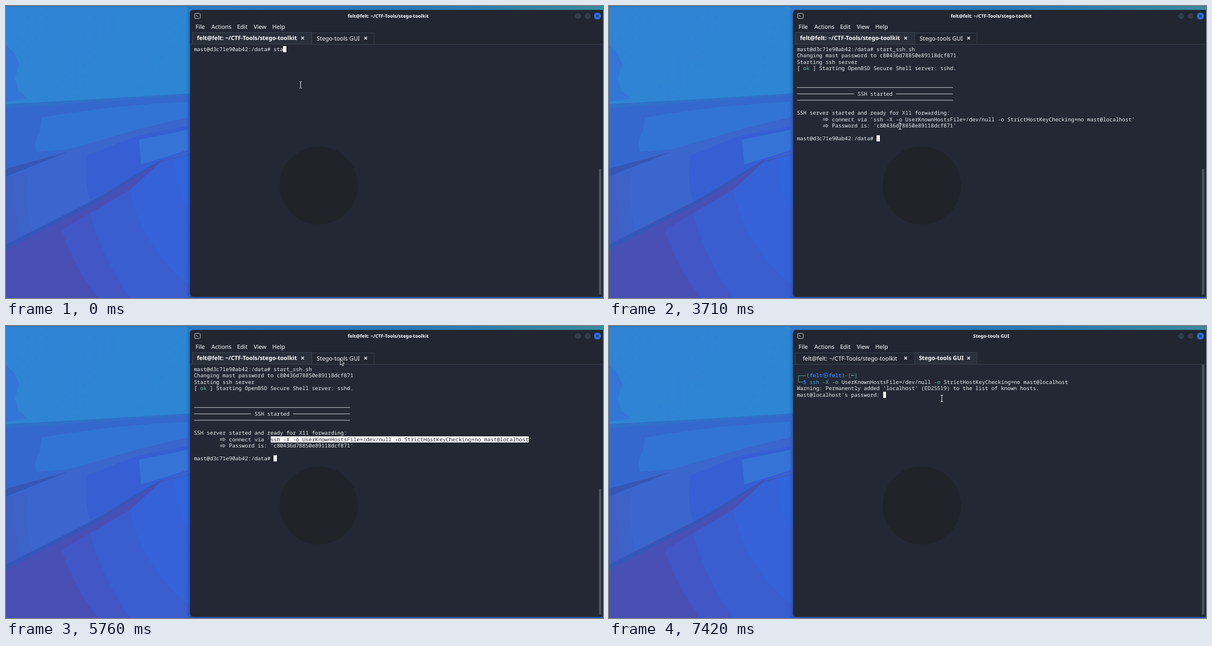
Animation, 1069 px wide and 524 px high, one loop 8 s. Source, as an HTML page:

```html
<!DOCTYPE html>
<html lang="en">
<head>
<meta charset="utf-8">
<title>Terminal session</title>
<style>
  html, body { margin: 0; width: 100%; height: 100%; overflow: hidden; background: #3565cf; }
  svg { display: block; width: 1069px; height: 524px; }
  text { white-space: pre; text-rendering: geometricPrecision; fill: #eef0f2; }
  .ui { font: 10.48px "Noto Sans", "Open Sans", sans-serif; }
  .ui text { fill: #fff; }
  .tab { text-anchor: middle; }
  .tab.on { font-weight: 700; font-size: 10.35px; }
  #title { font-weight: 700; font-size: 8.4px; text-anchor: middle; }
  #term { font: 9.52px "Noto Sans Mono", "DejaVu Sans Mono", monospace; }
  #term rect { shape-rendering: crispEdges; }
  .mark { font: 700 9.6px "Noto Sans CJK KR", "Noto Sans CJK JP", "Noto Sans CJK", sans-serif; text-anchor: middle; }
</style>
</head>
<body>
<svg viewBox="0 0 1069 524" xmlns="http://www.w3.org/2000/svg">
  <defs>
    <linearGradient id="sky" x2="1" y2="0.3">
      <stop offset="0" stop-color="#3183d5"/><stop offset="1" stop-color="#2c86d3"/>
    </linearGradient>
    <linearGradient id="strip">
      <stop offset="0" stop-color="#2b79c4"/><stop offset=".55" stop-color="#2a78b4"/><stop offset="1" stop-color="#3a8a9c"/>
    </linearGradient>
    <linearGradient id="shade">
      <stop offset="0" stop-color="#12306e" stop-opacity="0"/><stop offset="1" stop-color="#12306e" stop-opacity=".3"/>
    </linearGradient>
  </defs>

  <!-- wallpaper -->
  <rect width="340" height="524" fill="#3568cf"/>
  <path d="M0 0H340V158L180 168L0 183Z" fill="url(#sky)"/>
  <path d="M0 70L14 84L24 104L16 130L22 152L40 166L0 172Z" fill="#3377d6"/>
  <path d="M0 176L180 166L340 156V160L180 170L0 184Z" fill="#2f70c8"/>
  <path d="M64 200Q190 178 326 172V238L120 256L54 262Q50 240 60 228Z" fill="#3274d5"/>
  <path d="M0 292L110 258L240 220L340 196V262L277 278L150 355L0 432Z" fill="#3a66cd"/>
  <path d="M0 292L110 262L60 282L0 306Z" fill="#3457b8"/>
  <path d="M146 268L238 232L326 216V262L277 278L150 350Q140 310 146 268Z" fill="#365fd3"/>
  <path d="M238 240L326 222V258L290 270L242 284Z" fill="#3573d6"/>
  <path d="M0 306L12 304Q8 360 28 416L0 432Z" fill="#405fc4"/>
  <path d="M12 304L40 296Q30 350 48 404L28 416Q8 360 12 304Z" fill="#3d62c8"/>
  <path d="M0 432L150 355L277 278L340 262V524H0Z" fill="#4850b6"/>
  <path d="M100 402L150 372Q170 450 222 524H166Q122 470 100 402Z" fill="#4157c6"/>
  <path d="M150 372L222 330Q246 420 318 494V524H222Q170 450 150 372Z" fill="#3a5dcf"/>
  <path d="M222 330L277 280L340 262V506L318 494Q238 420 222 330Z" fill="#3562d6"/>
  <path d="M318 494L340 506V524H318Z" fill="#3a5dcf"/>
  <path d="M302 276L340 262V376Q300 340 302 276Z" fill="#3065dc"/>
  <path d="M0 428L150 352L277 276V280L150 360L0 438Z" fill="#3756ba"/>
  <rect x="322" y="6" width="8" height="518" fill="url(#shade)"/>
  <rect x="325" width="744" height="12" fill="url(#strip)"/>
  <rect width="330" height="2" fill="#2b78bd"/>
  <rect x="329" y="518" width="740" height="6" fill="#2c50a8"/>

  <!-- window -->
  <rect x="329.5" y="7" width="744" height="515" rx="6" fill="#232834"/>
  <path d="M329.5 69V13Q329.5 7 335.5 7H1069V69Z" fill="#212631"/>
  <circle cx="560" cy="322" r="70" fill="#20232a"/>
  <rect x="337.8" y="13.3" width="10" height="9" rx="1.2" fill="#1c2027" stroke="#d9dce0" stroke-width=".9"/>
  <path d="M339.8 15.6L341.4 17L339.8 18.4M342 18.6H344" fill="none" stroke="#e9ebed" stroke-width=".8"/>
  <g fill="#343c49" stroke="#191d25" stroke-width=".8">
    <circle cx="1024.5" cy="18" r="6"/><circle cx="1041.5" cy="18" r="6"/>
  </g>
  <circle cx="1059" cy="18" r="6.3" fill="#2f70e6"/>
  <path d="M1056.8 15.8l4.4 4.4m0 -4.4l-4.4 4.4" stroke="#1b2638" stroke-width="1.2"/>
  <g class="ui">
    <text id="title" x="684.5" y="20.8"></text>
    <text x="339.5" y="40.8">File</text>
    <text x="367.7" y="40.8">Actions</text>
    <text x="413.7" y="40.8">Edit</text>
    <text x="443.4" y="40.8">View</text>
    <text x="476.8" y="40.8">Help</text>
    <path d="M330 68.5H1069" stroke="#363d48"/>
    <rect id="box0" x="333.5" width="214" stroke="#3b424e"/>
    <rect id="box1" x="547.5" width="111.5" stroke="#3b424e"/>
    <text id="tab0" x="431.5">felt@felt: ~/CTF-Tools/stego-toolkit</text>
    <text id="tab1" x="595">Stego-tools GUI</text>
    <path d="M528.8 55.2l4.8 4.8m0 -4.8l-4.8 4.8M641.6 55.2l4.8 4.8m0 -4.8l-4.8 4.8" stroke="#f4f5f6" stroke-width="1.3"/>
  </g>
  <rect id="bar" x="1061.6" width="4.4" rx="2" fill="#4c525c"/>

  <g id="term"></g>

  <g id="beam" fill="none">
    <path d="M-2.4 -5.8H-1L0 -5L1 -5.8H2.4M0 -5V5M-2.4 5.8H-1L0 5L1 5.8H2.4" stroke="#20242c" stroke-width="2.4"/>
    <path d="M-2.4 -5.8H-1L0 -5L1 -5.8H2.4M0 -5V5M-2.4 5.8H-1L0 5L1 5.8H2.4" stroke="#eef0f2" stroke-width="1"/>
  </g>
  <path id="arrow" d="M0 0V10.4L2.4 8.3L4.2 12.2L5.9 11.4L4.2 7.7H7.3Z" fill="#0c0e11" stroke="#f4f5f6" stroke-width=".9"/>
</svg>

<script>
const LOOP = 8000, LEFT = 336.4, TOP = 72, CELL_W = 40 / 7, CELL_H = 80 / 7;
const WHITE = "#eef0f2", DARK = "#232834", GREEN = "#5ebdab", BLUE = "#367bf0", CYAN = "#49aee6";
const SWITCH = 5920;
const PROMPT = "mast@d3c71e90ab42:/data# ";
const SSH = "ssh -X -o UserKnownHostsFile=/dev/null -o StrictHostKeyChecking=no mast@localhost";
const PASSWORD = "c80436d78850e89118dcf871";
const $ = id => document.getElementById(id);

// Steps hold their value until the next time
const typing = [[0, "sta"], [150, "star"], [270, "start"], [550, "start_"], [830, "start_ss"],
  [1640, "start_ssh"], [1760, "start_ssh.sh "]];
const selection = [[0, 0], [4520, 3], [4640, 28], [4760, 63], [4910, 81]];
const pointer = [
  [0, 527.5, 141.5], [3710, 521, 215.5], [3860, 523.5, 233.5], [4010, 514, 222], [4130, 497, 208],
  [4250, 487, 205.5], [4520, 477, 205], [4640, 645, 207], [4760, 882, 207], [4910, 891, 205.5],
  [5340, 812, 174], [5460, 717.5, 136], [5610, 612, 75], [5760, 598.5, 59.5, 1], [5920, 598.5, 65, 1],
  [6070, 598, 72], [6190, 597, 110], [6310, 596, 130]
];
const at = (steps, t) => steps.findLast(s => s[0] <= t);

const colX = c => +(LEFT + c * CELL_W).toFixed(2);
const rowY = r => +(TOP + r * CELL_H).toFixed(2);

function block(col, row, count, fill) {
  return `<rect x="${colX(col)}" y="${rowY(row)}" width="${count * CELL_W}" height="11.2" fill="${fill}"/>`;
}
function put(col, row, str, fill = WHITE, bold = false) {
  return `<text x="${colX(col)}" y="${rowY(row) + 8.9}" style="fill:${fill}"${bold ? ' font-weight="700"' : ""}>${str}</text>`;
}
function rule(col, row, count) {
  const y = rowY(row) + 5.7;
  return `<path d="M${colX(col) + .4} ${y}H${colX(col + count) - .4}" stroke="${WHITE}" stroke-width=".8"/>`;
}
function implies(col, row) {
  const x = colX(col) + 1, y = rowY(row) + 5.8;
  return `<path d="M${x} ${y - 1.2}h7.6M${x} ${y + 1.2}h7.6M${x + 6} ${y - 3}l3.4 3l-3.4 3" fill="none" stroke="${WHITE}" stroke-width=".8"/>`;
}
const cursor = (col, row) => block(col, row, 1, "#fff");

function serverTab(t) {
  if (t < 2720) {
    const line = PROMPT + at(typing, t)[1];
    return put(0, 0, line) + cursor(line.length, 0);
  }
  let out = put(0, 0, PROMPT + "start_ssh.sh") + put(0, 1, "Changing mast password to " + PASSWORD)
    + put(0, 2, "Starting ssh server");
  if (t < 2840) return out + cursor(0, 3);
  out += put(0, 3, "[    ] Starting OpenBSD Secure Shell server: sshd.") + put(2, 3, "ok", GREEN)
    + rule(0, 6, 49) + rule(0, 7, 18) + put(19, 7, "SSH started") + rule(31, 7, 18) + rule(0, 8, 49)
    + put(0, 10, "SSH server started and ready for X11 forwarding:")
    + implies(8, 11) + put(11, 11, `connect via '${SSH}'`)
    + implies(8, 12) + put(11, 12, `Password is: '${PASSWORD}'`)
    + put(0, 14, PROMPT) + cursor(25, 14);
  const n = at(selection, t)[1];
  return n ? out + block(24, 11, n, "#fff") + put(24, 11, SSH.slice(0, n), DARK) : out;
}

function command(row, marked) {
  let out = marked ? block(4, row, SSH.length, "#fff") : "";
  for (const m of SSH.matchAll(/\S+/g)) {
    const col = 4 + m.index, word = m[0];
    const tint = word === "ssh" ? CYAN : word[0] === "-" ? GREEN : WHITE;
    if (marked && tint !== WHITE) out += block(col, row, word.length, tint);
    out += put(col, row, word, marked ? DARK : tint);
  }
  return out;
}

function clientTab(t) {
  const y = rowY(1) + 5.7;
  let out = `<path d="M${colX(3)} ${y}H${colX(.5)}V${y + CELL_H}H${colX(2)}" fill="none" stroke="${GREEN}" stroke-width=".8"/>`
    + put(3, 1, "(", GREEN) + put(4, 1, "felt", BLUE, true)
    + `<text class="mark" x="${colX(9)}" y="${rowY(1) + 9}" style="fill:${BLUE}">㉿</text>`
    + put(10, 1, "felt", BLUE, true) + put(14, 1, ")-[", GREEN) + put(17, 1, "~", WHITE, true)
    + put(18, 1, "]", GREEN) + put(2, 2, "$", BLUE, true);
  if (t < 6460) return out + cursor(4, 2);
  out += command(2, t < 7140);
  if (t < 7420) return out + cursor(4 + SSH.length, 2);
  return out + put(0, 3, "Warning: Permanently added 'localhost' (ED25519) to the list of known hosts.")
    + put(0, 4, "mast@localhost's password: ") + cursor(27, 4);
}

function chrome(second) {
  $("title").textContent = $(second ? "tab1" : "tab0").textContent;
  [0, 1].forEach(i => {
    const on = i === +second, box = $("box" + i), tab = $("tab" + i);
    box.setAttribute("y", on ? 47.5 : 48.5);
    box.setAttribute("height", on ? 21 : 20);
    box.setAttribute("fill", on ? "#2a303b" : "#212631");
    tab.setAttribute("class", on ? "tab on" : "tab");
    tab.setAttribute("y", on ? 61.3 : 61.8);
  });
  $("bar").setAttribute("y", second ? 69 : 292);
  $("bar").setAttribute("height", second ? 449 : 226);
}

let shown = "", tabShown = null;
function draw(now) {
  const t = now % LOOP, second = t >= SWITCH;
  if (second !== tabShown) chrome(tabShown = second);
  const screen = second ? clientTab(t) : serverTab(t);
  if (screen !== shown) $("term").innerHTML = shown = screen;
  const [, x, y, isArrow] = at(pointer, t);
  for (const id of ["beam", "arrow"]) {
    $(id).setAttribute("transform", `translate(${x} ${y})`);
    $(id).setAttribute("visibility", (id === "arrow") === !!isArrow ? "visible" : "hidden");
  }
}

const start = performance.now();
function tick() {
  draw(performance.now() - start);
  requestAnimationFrame(tick);
}
tick();
</script>
</body>
</html>
```
